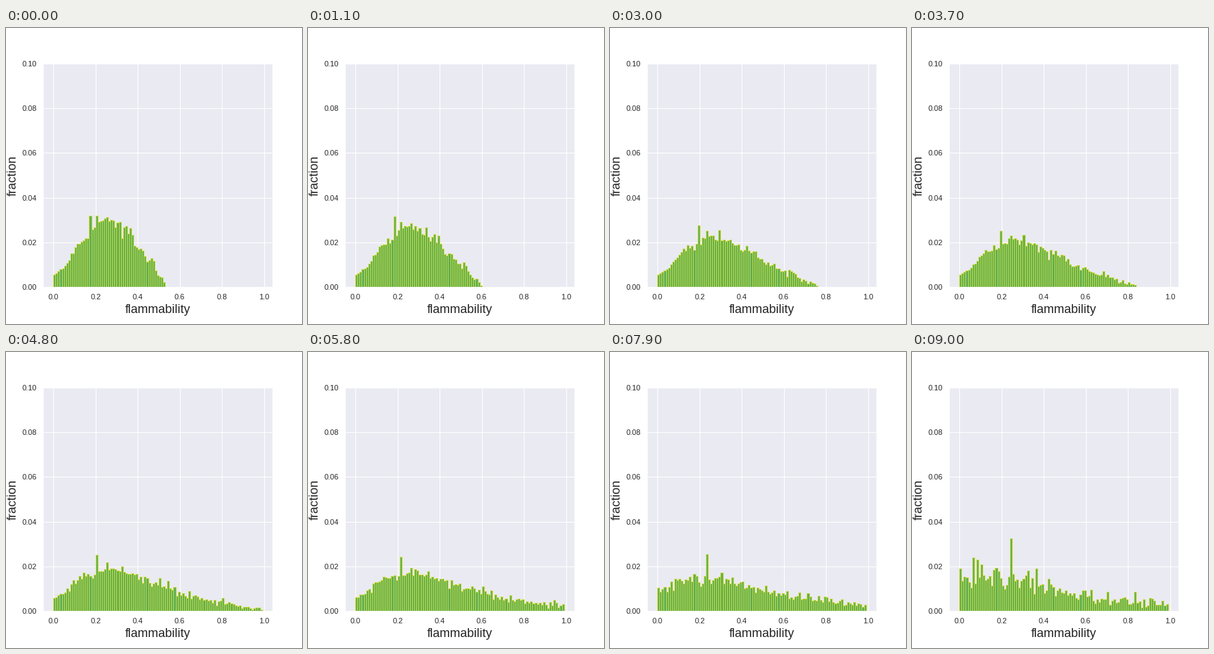
Animation of 432 by 432 pixels, one loop 9.1 s. Source, as a matplotlib script:

```python
import numpy as np
import matplotlib.pyplot as plt
from matplotlib.animation import FuncAnimation

FRAMES, STEP = 91, 100
BINS = np.arange(100) / 100
TREES, CLONES = 7000, 55
DRIFT = 0.19      # growth of flammability per second
TURNOVER = 0.93   # rate at which survival reshapes the population
T_END = (FRAMES - 1) * STEP / 1000

rng = np.random.default_rng(4)


def plant():
    """Sample a skewed bell of trees, with one cluster of clones."""
    x = np.linspace(0.0005, 0.529, 1000)
    density = np.interp(x, [0, 0.03, 0.1, 0.2, 0.255, 0.35, 0.45, 0.53],
                        [5, 6.5, 16.5, 29, 32.5, 25.5, 12.5, 2.5])
    cdf = np.cumsum(density)
    trees = np.interp(rng.random(TREES), cdf / cdf[-1], x)
    trees[:CLONES] = 0.174
    return trees


def grow(x, t):
    return 1 / np.maximum(1 / x - DRIFT * t, 0.5)


trees = plant()
# Final offspring per tree: few succeed, and low flammability is favoured.
luck = rng.gamma(0.3, 1 / 0.3, TREES)
luck[:CLONES] = 1
share = luck * (1 + 1.8 * np.exp(-grow(trees, T_END) / 0.11))


def heights(t):
    k = np.exp(TURNOVER * (t - T_END))
    weight = 1 + (share - 1) * k
    return np.histogram(grow(trees, t), BINS, weights=weight)[0] / TREES


plt.rcParams.update({
    "font.family": "Liberation Sans",
    "text.color": "0.15",
    "axes.labelcolor": "0.15",
    "axes.edgecolor": "white",
    "axes.linewidth": 1.25,
    "xtick.color": "0.15",
    "ytick.color": "0.15",
})

fig = plt.figure(figsize=(6, 6), dpi=72, facecolor="white")
ax = fig.add_axes([0.125, 0.125, 0.775, 0.755], facecolor="#eaeaf2")
ax.set(xlim=(-0.0495, 1.0395), ylim=(0, 0.1))
ax.set_axisbelow(True)
ax.grid(color="white", lw=1)
ax.tick_params(length=0, pad=9.5, labelsize=11)
ax.set_xlabel("flammability", fontsize=18, labelpad=5)
ax.set_ylabel("fraction", fontsize=18, y=0.497)

bars = ax.bar(BINS[:-1], np.zeros(99), width=0.01, align="edge",
              facecolor="#62b058", edgecolor="#c8d834", lw=1)


def draw(i):
    for bar, h in zip(bars, heights(i * STEP / 1000)):
        bar.set_height(h)
        bar.set_visible(h > 0)
    return bars


anim = FuncAnimation(fig, draw, frames=FRAMES, interval=STEP,
                     repeat=True, repeat_delay=0, blit=False)
plt.show()
```
